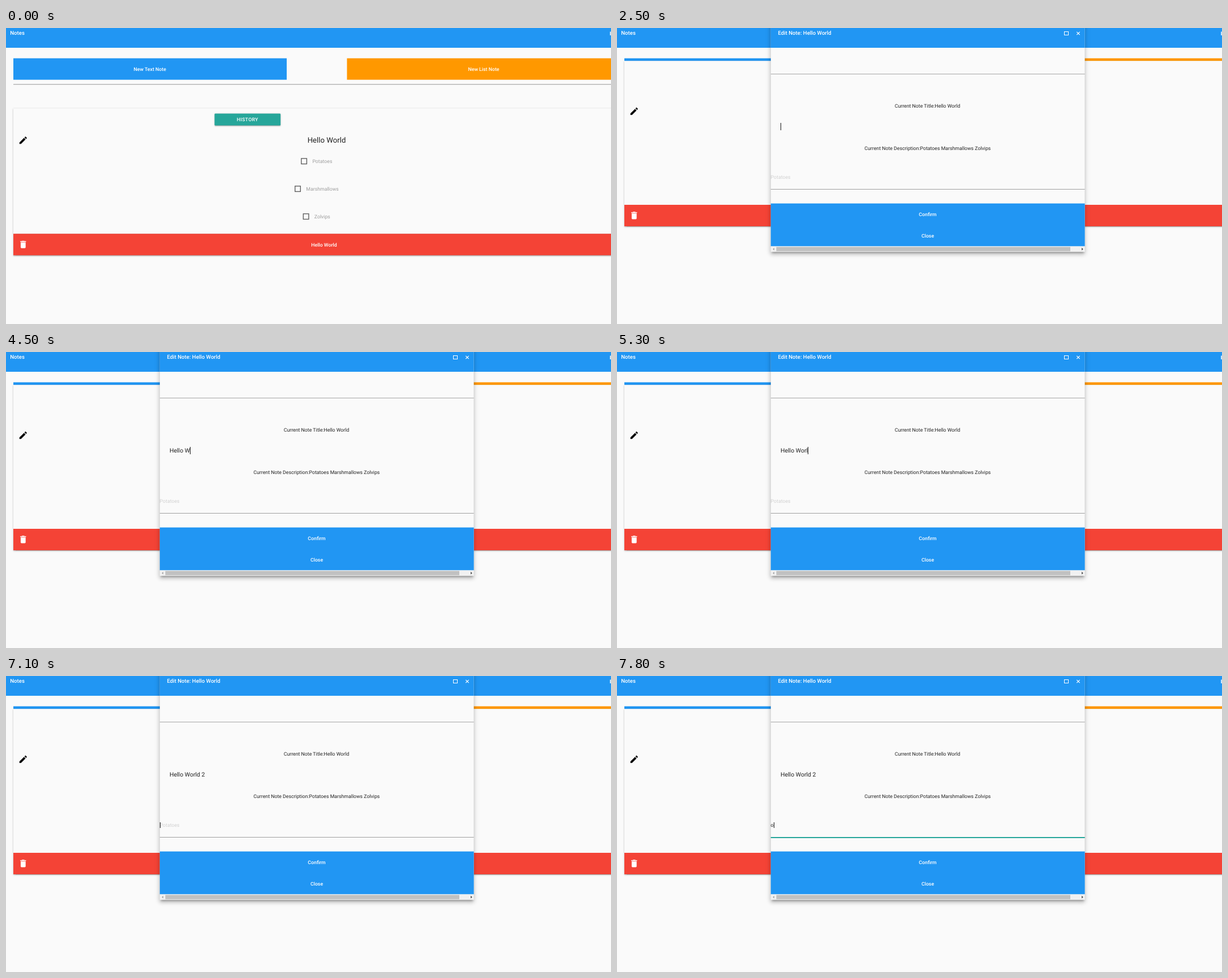
Write an HTML page with a canvas that moves like this. It is 1069 px wide and 524 px high and loops after 8 s.

```html
<!DOCTYPE html>
<html lang="en">
<head>
<meta charset="utf-8">
<title>Notes</title>
<style>
  html, body { margin: 0; width: 100%; height: 100%; overflow: hidden; background: #fafafa; }
  canvas { display: block; }
</style>
</head>
<body>
<canvas id="stage" width="1069" height="524"></canvas>
<script>
const ctx = document.getElementById('stage').getContext('2d');
const LOOP = 8000;
const BG = '#fafafa', BLUE = '#2196f3', ORANGE = '#ff9800', RED = '#f44336', TEAL = '#26a69a';
const SMALL = 8.75, INPUT = 10.5;
const ITEMS = ['Potatoes', 'Marshmallows', 'Zolvips'];

const PENCIL = new Path2D('M3 17.25V21h3.75L17.81 9.94l-3.75-3.75L3 17.25z' +
  'M20.71 7.04c.39-.39.39-1.02 0-1.41l-2.34-2.34c-.39-.39-1.02-.39-1.41 0l-1.83 1.83 3.75 3.75 1.83-1.83z');
const TRASH = new Path2D('M6 19c0 1.1.9 2 2 2h8c1.1 0 2-.9 2-2V7H6v12z' +
  'M19 4h-3.5l-1-1h-5l-1 1H5v2h14V4z');

// Time at which each character of the new title is typed
const TITLE = 'Hello World 2';
const KEY_TIMES = [3600, 3700, 3800, 3900, 4000, 4100, 4500, 4700, 5100, 5300, 5400, 5800, 5900];

// Shadow layers: offset y, blur, spread, opacity
const LOW = [[1.3, 1.3, 0, .14], [2, .7, -1.3, .12], [.7, 3.3, 0, .2]];
const HIGH = [[5.3, 6.7, .7, .14], [2, 9.3, 1.3, .12], [3.3, 3.3, -2, .3]];

function rect(x, y, w, h, color) {
  ctx.fillStyle = color;
  ctx.fillRect(x, y, w, h);
}

function text(str, x, y, { size = SMALL, color = '#fff', weight = 400, align = 'left', spacing = 0 } = {}) {
  ctx.font = `${weight} ${size}px Roboto, sans-serif`;
  ctx.textRendering = 'geometricPrecision';
  ctx.letterSpacing = spacing + 'px';
  ctx.textAlign = align;
  ctx.fillStyle = color;
  ctx.fillText(str, x, y);
}

function label(str, x, y, options) {
  text(str, x, y, { weight: 500, align: 'center', ...options });
}

function shadow(x, y, w, h, layers) {
  const away = 3000;
  for (const [dy, blur, spread, alpha] of layers) {
    ctx.save();
    ctx.shadowColor = `rgba(0,0,0,${alpha})`;
    ctx.shadowBlur = blur;
    ctx.shadowOffsetX = away;
    ctx.shadowOffsetY = dy;
    rect(x - spread - away, y - spread, w + 2 * spread, h + 2 * spread, '#000');
    ctx.restore();
  }
}

function icon(path, cx, cy, color) {
  ctx.save();
  ctx.translate(cx, cy);
  ctx.scale(.73, .73);
  ctx.translate(-12, -12);
  ctx.fillStyle = color;
  ctx.fill(path);
  ctx.restore();
}

function triangle(x, y, dir, color) {
  ctx.fillStyle = color;
  ctx.beginPath();
  ctx.moveTo(x + dir * 1.4, y);
  ctx.lineTo(x - dir * 1.2, y - 2.4);
  ctx.lineTo(x - dir * 1.2, y + 2.4);
  ctx.fill();
}

function drawPage() {
  rect(0, 0, 1069, 524, BG);
  rect(0, 0, 1069, 35, BLUE);
  text('Notes', 7.3, 11.6, { size: 9.6, weight: 500 });
  rect(1067, 6.5, 2, 6.5, 'rgba(255,255,255,.75)');
  rect(13, 53.6, 483, 38, BLUE);
  rect(602.5, 53.6, 467, 38, ORANGE);
  label('New Text Note', 254.2, 75.8);
  label('New List Note', 844, 75.8);
  rect(13, 99.2, 1056, 1.2, '#a6a6a6');
}

function drawCard(top, barTop, pencilY) {
  shadow(13, top, 1100, barTop + 38 - top, LOW);
  rect(13, top, 1100, barTop - top, BG);
  rect(13, barTop, 1100, 38, RED);
  icon(PENCIL, 30.3, pencilY, '#000');
  icon(TRASH, 30.3, barTop + 18.9, '#fff');
}

function checkbox(cx, cy, name, textX) {
  ctx.strokeStyle = '#5a5a5a';
  ctx.lineWidth = 1.35;
  ctx.strokeRect(cx - 4.8, cy - 4.8, 9.6, 9.6);
  text(name, textX, cy + 3.3, { color: '#9e9e9e' });
}

function drawList() {
  drawCard(142.3, 364.3, 198.8);
  shadow(368.5, 151.6, 116.6, 20.9, LOW);
  ctx.fillStyle = TEAL;
  ctx.beginPath();
  ctx.roundRect(368.5, 151.6, 116.6, 20.9, 1.3);
  ctx.fill();
  label('HISTORY', 426.7, 165.1, { spacing: .33 });
  label('Hello World', 566.5, 203, { size: 13.2, weight: 400, color: '#212121' });
  checkbox(526.6, 235.8, ITEMS[0], 541.4);
  checkbox(515.5, 284.7, ITEMS[1], 530.3);
  checkbox(530.1, 333.7, ITEMS[2], 544.8);
  label('Hello World', 562, 386.6);
}

function drawWindowIcons() {
  ctx.strokeStyle = '#fff';
  ctx.lineWidth = 1;
  ctx.strokeRect(790.5, 6.5, 7, 6);
  ctx.lineWidth = 1.2;
  ctx.beginPath();
  ctx.moveTo(812.3, 6.8);
  ctx.lineTo(817.7, 12.2);
  ctx.moveTo(817.7, 6.8);
  ctx.lineTo(812.3, 12.2);
  ctx.stroke();
}

function drawScrollbar(x, w) {
  rect(x, 386.5, w, 9.7, '#f1f1f1');
  rect(281.5, 387.6, 519.5, 7.6, '#c1c1c1');
  triangle(276.7, 391.4, -1, '#a3a3a3');
  triangle(822.3, 391.4, 1, '#404040');
}

function titleCaretOn(t) {
  return (t >= 2500 && t < 3000) || (t >= 3500 && t < 6400) || (t >= 6900 && t < 7100);
}

function drawTitleInput(t) {
  const typed = TITLE.slice(0, KEY_TIMES.filter(k => t >= k).length);
  text(typed, 289, 178.4, { size: INPUT, color: '#212121' });
  if (titleCaretOn(t)) {
    rect(Math.floor(289.2 + ctx.measureText(typed).width), 168, 1, 13, '#111');
  }
}

function drawItemInput(t, x, w) {
  const typed = t >= 7800;
  text(typed ? 'o' : ITEMS[0], 271.6, 267.3, { color: typed ? '#212121' : '#d1d1d1' });
  if (t >= 7100 && t < 7600) rect(272, 259, 1, 10, '#111');
  if (typed) rect(277, 259, 1, 10, '#111');

  // The focus line fades in over 300 ms in steps of 100 ms
  const focus = Math.max(0, Math.min(1, Math.floor((t - 7100) / 100) / 3));
  const fade = focus * focus * (3 - 2 * focus);
  rect(x, 285, w, 1, '#9e9e9e');
  ctx.globalAlpha = fade;
  rect(x, 285, w, 2, TEAL);
  ctx.globalAlpha = 1;
}

function drawDialog(t) {
  const x = 271.8, w = 554.8;
  drawCard(58.2, 313, 147.4);
  shadow(x, -40, w, 436.2, HIGH);
  rect(x, 0, w, 396.2, BG);
  rect(x, 0, w, 35, BLUE);
  text('Edit Note: Hello World', 284.5, 11.6, { size: 9.6, weight: 500 });
  drawWindowIcons();
  rect(x, 81, w, 1, '#a6a6a6');

  text('Current Note Title:Hello World', 490.7, 141.2, { color: '#212121' });
  text('Current Note Description:' + ITEMS.join(' '), 437.3, 215.6, { color: '#212121' });
  drawTitleInput(t);
  drawItemInput(t, x, w);

  rect(x, 310.6, w, 75.9, BLUE);
  label('Confirm', 549, 332.9);
  label('Close', 549, 370.8);
  drawScrollbar(x, w);
}

function frame() {
  const t = performance.now() % LOOP;
  drawPage();
  if (t < 1500) drawList();
  else drawDialog(t);
  requestAnimationFrame(frame);
}
frame();
</script>
</body>
</html>
```
